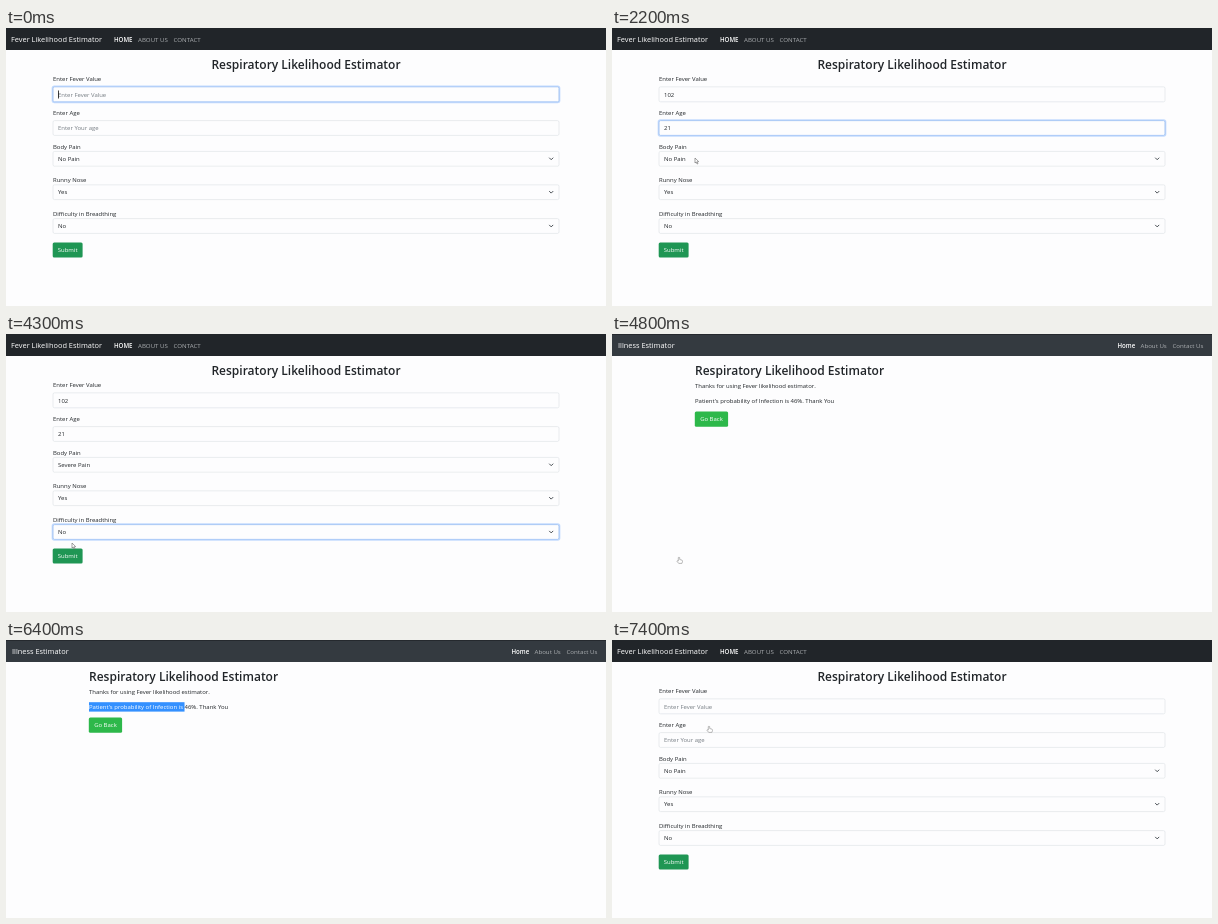
Write an HTML page with a canvas that moves like this. It is 600 px wide and 278 px high and loops after 7.5 s.

```html
<!DOCTYPE html>
<html lang="en">
<head>
<meta charset="utf-8">
<title>Health form</title>
<style>
  html, body { margin: 0; width: 100%; height: 100%; overflow: hidden; background: #fdfdfe; }
  canvas { display: block; }
</style>
</head>
<body>
<canvas id="stage" width="600" height="278"></canvas>
<script>
const ctx = document.getElementById('stage').getContext('2d');
const LOOP = 7500, STEP = 100;
const RESULT_AT = 4800, RETURN_AT = 7400;
const PAGE = '#fdfdfe', INK = '#212529', HINT = '#757c83', LINK = '#adb0b3';
const BODY = 5.96, NAV = 6.15, BRAND = 7.4, HEAD = 12;
const LEFT = 47, WIDTH = 506;

// label baseline, box top, box height
const rows = [
  { label: 'Enter Fever Value', base: 53.4, top: 58.8, h: 15, hint: 'Enter Fever Value' },
  { label: 'Enter Age', base: 87.2, top: 92.6, h: 14.8, hint: 'Enter Your age' },
  { label: 'Body Pain', base: 120.6, top: 123.4, h: 14.8, select: true },
  { label: 'Runny Nose', base: 154.4, top: 156.8, h: 14.8, select: true },
  { label: 'Difficulty in Breadthing', base: 187.6, top: 190.6, h: 14.8, select: true }
];
const focusAt = [-1000, 1500, 2300, 2900, 3800, 4400, 9999];

const formPath = [
  [1900, 130, 205], [2200, 83, 130], [2600, 83, 130], [2800, 80, 148],
  [3000, 64, 166], [3400, 64, 166], [3500, 63, 177], [3800, 65, 195],
  [4100, 65, 195], [4500, 67, 223]
];
const resultPath = [
  [4900, 67, 223], [5500, 83, 66], [6400, 178, 66], [6800, 122, 99], [7100, 97, 86]
];

const clamp = v => Math.max(0, Math.min(1, v));

function text(str, x, y, color = INK, size = BODY, weight = 400, align = 'left') {
  ctx.font = `${weight} ${size}px "Open Sans", "Noto Sans", sans-serif`;
  ctx.textAlign = align;
  ctx.fillStyle = color;
  ctx.fillText(str, x, y);
}

function rect(x, y, w, h, color) {
  ctx.fillStyle = color;
  ctx.fillRect(x, y, w, h);
}

function box(x, y, w, h, r, fill, stroke, line = 0.6) {
  ctx.beginPath();
  ctx.roundRect(x, y, w, h, r);
  if (fill) { ctx.fillStyle = fill; ctx.fill(); }
  if (stroke) { ctx.strokeStyle = stroke; ctx.lineWidth = line; ctx.stroke(); }
}

function button(label, x, y, w, h, color) {
  box(x, y, w, h, 1.5, color);
  text(label, x + w / 2, y + h / 2 + 2.2, '#fff', BODY, 500, 'center');
}

function glow(x, y, w, h, rgb, amount) {
  if (amount > 0) box(x - 0.6, y - 0.6, w + 1.2, h + 1.2, 2, null, `rgba(${rgb},${0.24 * amount})`, 1.5);
}

function focus(i, t) {
  if (t >= RETURN_AT) return 0;
  const ramp = start => clamp((t - start + 75) / 200) * (t >= start);
  return ramp(focusAt[i]) - ramp(focusAt[i + 1]);
}

function pointAt(path, t) {
  if (t < path[0][0]) return null;
  for (let i = 1; i < path.length; i++) {
    const [t0, x0, y0] = path[i - 1], [t1, x1, y1] = path[i];
    if (t <= t1) {
      const k = (t - t0) / (t1 - t0);
      return [x0 + (x1 - x0) * k, y0 + (y1 - y0) * k];
    }
  }
  return path[path.length - 1].slice(1);
}

function cursor([x, y], hand) {
  const path = new Path2D(hand
    ? 'M-.7 .6Q0-.5 .7 .6V2.5L3 3.2Q3.7 3.5 3.5 4.5L2.9 6.4H-.3L-2 4.3Q-2 3.4-.7 4Z'
    : 'M0 0V5L1.2 4L2.1 6L3 5.6L2.2 3.7L3.7 3.6Z');
  ctx.save();
  ctx.translate(x, y);
  ctx.fillStyle = '#fff';
  ctx.strokeStyle = hand ? '#8a8a8a' : '#666';
  ctx.lineWidth = 0.6;
  ctx.fill(path);
  ctx.stroke(path);
  ctx.restore();
}

function valueOf(i, t) {
  const fresh = t >= RETURN_AT;
  if (i === 0) return fresh || t < 400 ? '' : t < 800 ? '1' : t < 1000 ? '10' : '102';
  if (i === 1) return fresh || t < 1900 ? '' : t < 2000 ? '2' : '21';
  if (i === 2) return fresh || t < 2800 ? 'No Pain' : 'Severe Pain';
  return i === 3 ? 'Yes' : 'No';
}

function field(row, i, t) {
  const { top, h } = row, mid = top + h / 2;
  const on = focus(i, t), value = valueOf(i, t);
  text(row.label, LEFT, row.base);
  glow(LEFT, top, WIDTH, h, '13,110,253', on);
  box(LEFT, top, WIDTH, h, 1.5, PAGE, '#d5dade', 0.5);
  if (on > 0) box(LEFT, top, WIDTH, h, 1.5, null, `rgba(134,183,254,${on})`, 0.6);
  text(value || row.hint, 52, mid + 2.2, value ? INK : HINT);
  if (row.select) {
    ctx.beginPath();
    ctx.moveTo(543.2, mid - 1.1);
    ctx.lineTo(545.2, mid + 0.9);
    ctx.lineTo(547.2, mid - 1.1);
    ctx.strokeStyle = '#343a40';
    ctx.lineWidth = 0.9;
    ctx.stroke();
  }
}

function drawForm(t) {
  rect(0, 0, 600, 22, '#212529');
  text('Fever Likelihood Estimator', 5, 14, '#fff', BRAND);
  text('HOME', 108, 13.5, '#fff', NAV, 600);
  text('ABOUT US', 132, 13.5, LINK, NAV);
  text('CONTACT', 167.5, 13.5, LINK, NAV);
  text('Respiratory Likelihood Estimator', 300, 41, INK, HEAD, 600, 'center');
  rows.forEach((row, i) => field(row, i, t));
  if (t < 200) rect(52, 62.5, 0.8, 8, '#111');

  const over = t >= 4400 && t < RESULT_AT;
  glow(46.7, 214.6, 29.9, 14.8, '25,135,84', focus(5, t));
  button('Submit', 46.7, 214.6, 29.9, 14.8, over ? '#157347' : '#1f9654');

  const back = t >= RETURN_AT;
  const spot = back ? [97, 86] : pointAt(formPath, t);
  if (spot) cursor(spot, over || back);
}

function drawResult(t) {
  rect(0, 0, 600, 22, '#343a40');
  rect(0, 0, 600, 1, '#25292e');
  text('Illness Estimator', 6, 14.3, '#fff', BRAND);
  text('Home', 505.5, 13.7, '#fff', NAV, 600);
  text('About Us', 528.5, 13.7, LINK, NAV);
  text('Contact Us', 560.5, 13.7, LINK, NAV);
  text('Respiratory Likelihood Estimator', 83, 41, INK, HEAD, 600);
  text('Thanks for using Fever likelihood estimator.', 83, 53.5);

  const marked = "Patient's probability of Infection is ";
  const line = marked + '46%. Thank You';
  text(line, 83, 69.3);
  const count = t < 7200 ? Math.round(marked.length * clamp((t - 5500) / 400)) : 0;
  if (count) {
    const part = line.slice(0, count);
    rect(83, 62.2, ctx.measureText(part).width, 9.4, '#3390ff');
    text(part, 83, 69.3, '#fff');
  }

  const over = t >= 7000;
  button('Go Back', 82.8, 77.6, 33.3, 15.2, over ? '#24a041' : '#2db84a');

  // the pointer is a text beam while marking, too thin to show
  if (t < 5500 || t > 6400) cursor(pointAt(resultPath, Math.max(t, 4900)), t < 5000 || over);
}

function draw(elapsed) {
  const t = Math.floor((elapsed % LOOP) / STEP) * STEP;
  rect(0, 0, 600, 278, PAGE);
  if (t >= RESULT_AT && t < RETURN_AT) drawResult(t);
  else drawForm(t);
}

let begin;
function tick(now) {
  begin ??= now;
  draw(now - begin);
  requestAnimationFrame(tick);
}
requestAnimationFrame(tick);
</script>
</body>
</html>
```
